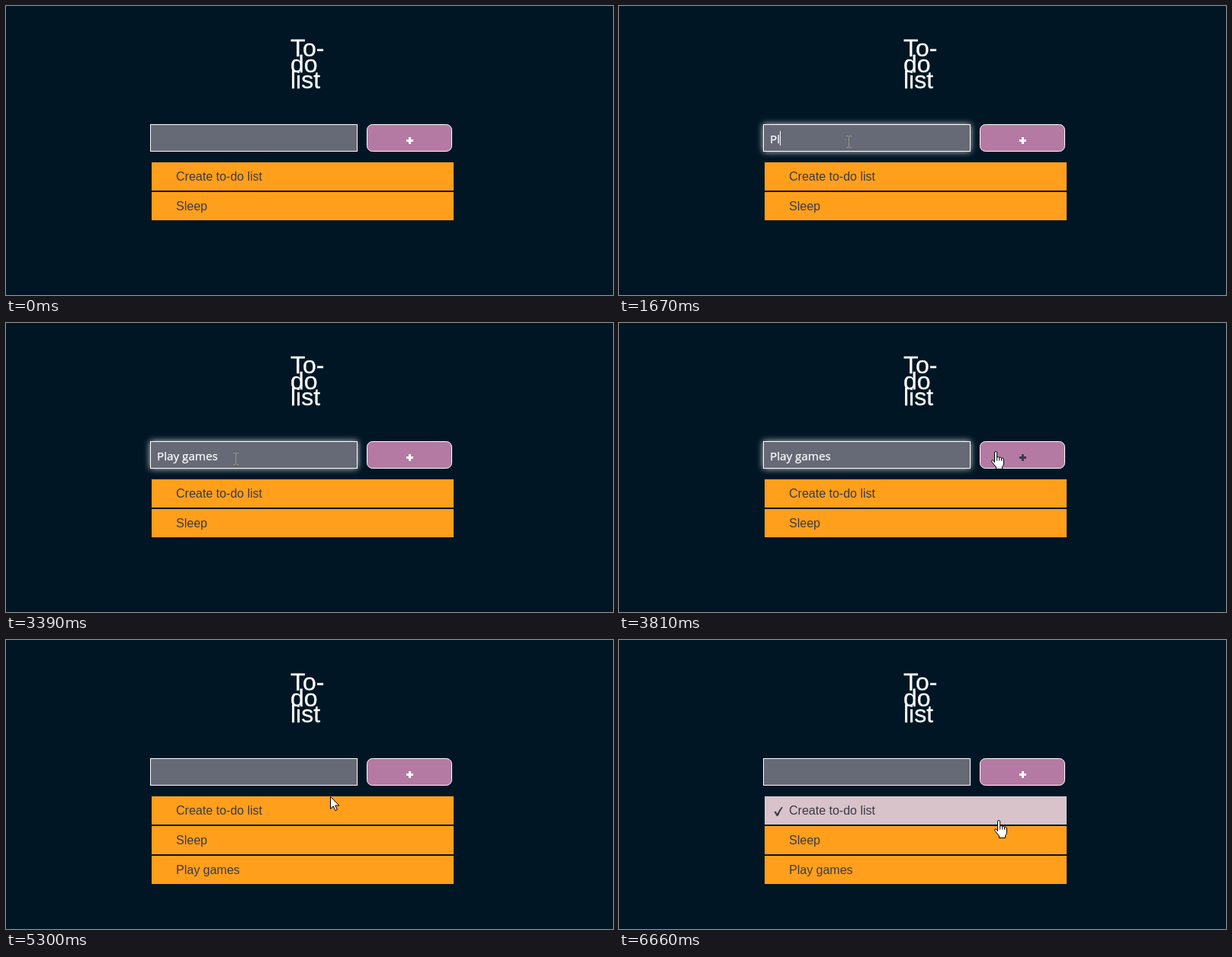
An HTML page for the animation above (7250 ms loop, 796x379 px).

```html
<!DOCTYPE html>
<html lang="en">
<head>
<meta charset="utf-8">
<title>To-do list</title>
<style>
  html, body { margin: 0; width: 100%; height: 100%; overflow: hidden; background: #001625; }
  svg { display: block; }
  text { font-family: "Liberation Sans", Arial, sans-serif; font-size: 16px; fill: #3b3b45; white-space: pre; }
  .title text { font-size: 32px; fill: #fff; stroke: #fff; stroke-width: .3px; }
  #entry { font-family: "Open Sans", sans-serif; font-size: 15.2px; fill: #fff; stroke: #fff; stroke-width: .25px; }
  .row { fill: #ff9f1c; }
  .row.hover { fill: #d8c3ca; }
  .box { stroke: #fff; }
  .hidden { display: none; }
</style>
</head>
<body>
<svg width="796" height="379" viewBox="0 0 796 379">
  <defs>
    <filter id="blur" x="-10%" y="-60%" width="120%" height="220%" color-interpolation-filters="sRGB">
      <feGaussianBlur stdDeviation="4"/>
    </filter>
  </defs>
  <g class="title">
    <text x="373" y="66">To-</text>
    <text x="373" y="87">do</text>
    <text x="373" y="108">list</text>
  </g>

  <rect id="glow" x="189" y="155" width="272" height="36" fill="#fff5f0" filter="url(#blur)"/>
  <rect class="box" x="189.5" y="155.5" width="271" height="35" fill="#666a76"/>
  <text id="entry" x="198" y="179.5"></text>
  <rect id="caret" y="164" width="1" height="19" fill="#fff"/>

  <rect class="box" x="473.5" y="155.5" width="111" height="35" rx="7" fill="#b47aa3"/>
  <path id="plus" d="M528 172h3v3h3v3h-3v3h-3v-3h-3v-3h3z"/>

  <g id="list"></g>
  <path id="check" d="M203.3 225.8l2.2-1.2 2.1 3.2q2.4-5.4 5.6-8.8l1.5.4q-3.6 5-5.8 11.2l-2.2.5q-1-3-3.4-5.3z" fill="#3b3b45"/>

  <path id="arrow" d="M.5.5v16l3.8-3.6 2.5 5.8 2.5-1.1-2.5-5.6h5z" fill="#fff" stroke="#000"/>
  <path id="hand" fill="#fff" stroke="#000" stroke-linejoin="round"
    d="M-1.5 13.5V1.2a1.6 1.6 0 0 1 3.2 0V7q1.5-1.2 3 .4 1.6-.8 2.8.7 2.6-.7 3 1.9v5q0 2.5-2 4.5v3h-8v-2.6L-4.8 13.5q-1.2-2 .2-2.8 1-.4 3.1 2.8zM1.7 7v4.5M4.7 7.6v4M7.5 8.3v3.4"/>
  <path id="ibeam" d="M-3-7.5h3M1-7.5h3M-3 7.5h3M1 7.5h3M.5-7v14" fill="none" stroke="#99958a"/>
</svg>
<script>
const LOOP = 7250, TICK = 70;
const FOCUS = 540, ADDED = 4340, CHECKED = 5770, BLINK = 530;
const phrase = 'Play games';

const $ = id => document.getElementById(id);
const show = (el, on) => el.classList.toggle('hidden', !on);
const clamp = (v, lo, hi) => Math.min(hi, Math.max(lo, v));

// Each move starts where the previous one ended and bends toward `via`.
const moves = [
  { start: 70, end: 340, via: [430, 385], to: [301, 178], power: 4 },
  { start: 3330, end: 3810, via: [420, 184], to: [494, 169], power: 1 },
  { start: 5020, end: 5300, via: [470, 196], to: [425, 205], power: 1 },
  { start: 5300, end: 5570, via: [421, 212], to: [420, 219], power: 1 },
  { start: 6110, end: 6660, via: [450, 232], to: [498, 237], power: 1 }
];
const entryPoint = [669, 366];

function pointer(t) {
  let pos = entryPoint;
  for (const { start, end, via, to, power } of moves) {
    if (t < start) break;
    const steps = Math.round((end - start) / TICK);
    const k = clamp(Math.floor((t - start) / (end - start) * steps) / steps, 0, 1);
    const p = 1 - (1 - k) ** power, q = 1 - p;
    pos = pos.map((a, i) => Math.round(q * q * a + 2 * q * p * via[i] + p * p * to[i]));
  }
  return pos;
}

const inside = (x, y, l, t, r, b) => x >= l && x < r && y > t && y < b;

// The first letter comes early, the rest at an even pace.
const keyTime = i => i ? 1670 + (i - 1) * 112 : 1470;

const rows = ['Create to-do list', 'Sleep', phrase].map((label, i) => {
  const g = document.createElementNS('http://www.w3.org/2000/svg', 'g');
  const top = 205 + i * 39;
  g.innerHTML = `<rect class="row" x="191" y="${top}" width="396" height="37"/>
    <text x="223" y="${top + 24}">${label}</text>`;
  $('list').append(g);
  return { g, top, rect: g.firstChild };
});

function render(t) {
  const added = t >= ADDED;
  const [x, y] = pointer(t);
  const overInput = inside(x, y, 189, 155, 461, 191);
  const overButton = inside(x, y, 473, 155, 585, 191);
  let overRow = false;

  show(rows[2].g, added);
  for (const { rect, top } of rows) {
    const hover = inside(x, y, 191, top, 587, top + 37);
    rect.classList.toggle('hover', hover);
    overRow = overRow || hover;
  }

  const kind = overInput ? 'ibeam' : overButton || overRow ? 'hand' : 'arrow';
  for (const id of ['arrow', 'hand', 'ibeam']) {
    show($(id), id === kind && t >= moves[0].start);
    $(id).setAttribute('transform', `translate(${x} ${y})`);
  }

  const count = [...phrase].filter((_, i) => keyTime(i) <= t).length;
  const typed = added ? '' : phrase.slice(0, count);
  const entry = $('entry');
  if (entry.textContent !== typed) entry.textContent = typed;
  const width = typed ? entry.getComputedTextLength() : 0;
  const awake = count ? keyTime(count - 1) : FOCUS;
  $('caret').setAttribute('x', 198 + Math.ceil(width));
  show($('caret'), t >= awake && t < awake + BLINK);

  const fadeIn = Math.floor((t - FOCUS) / TICK) + 1;
  const fadeOut = Math.ceil((ADDED - t) / TICK) + 1;
  $('glow').setAttribute('opacity', clamp(Math.min(fadeIn, fadeOut) / 2, 0, 1) * .85);
  $('plus').setAttribute('fill', overButton ? '#3b3b45' : '#fff');
  show($('check'), t >= CHECKED);
}

const start = performance.now();
function tick() {
  render((performance.now() - start) % LOOP);
  requestAnimationFrame(tick);
}
tick();
</script>
</body>
</html>
```
